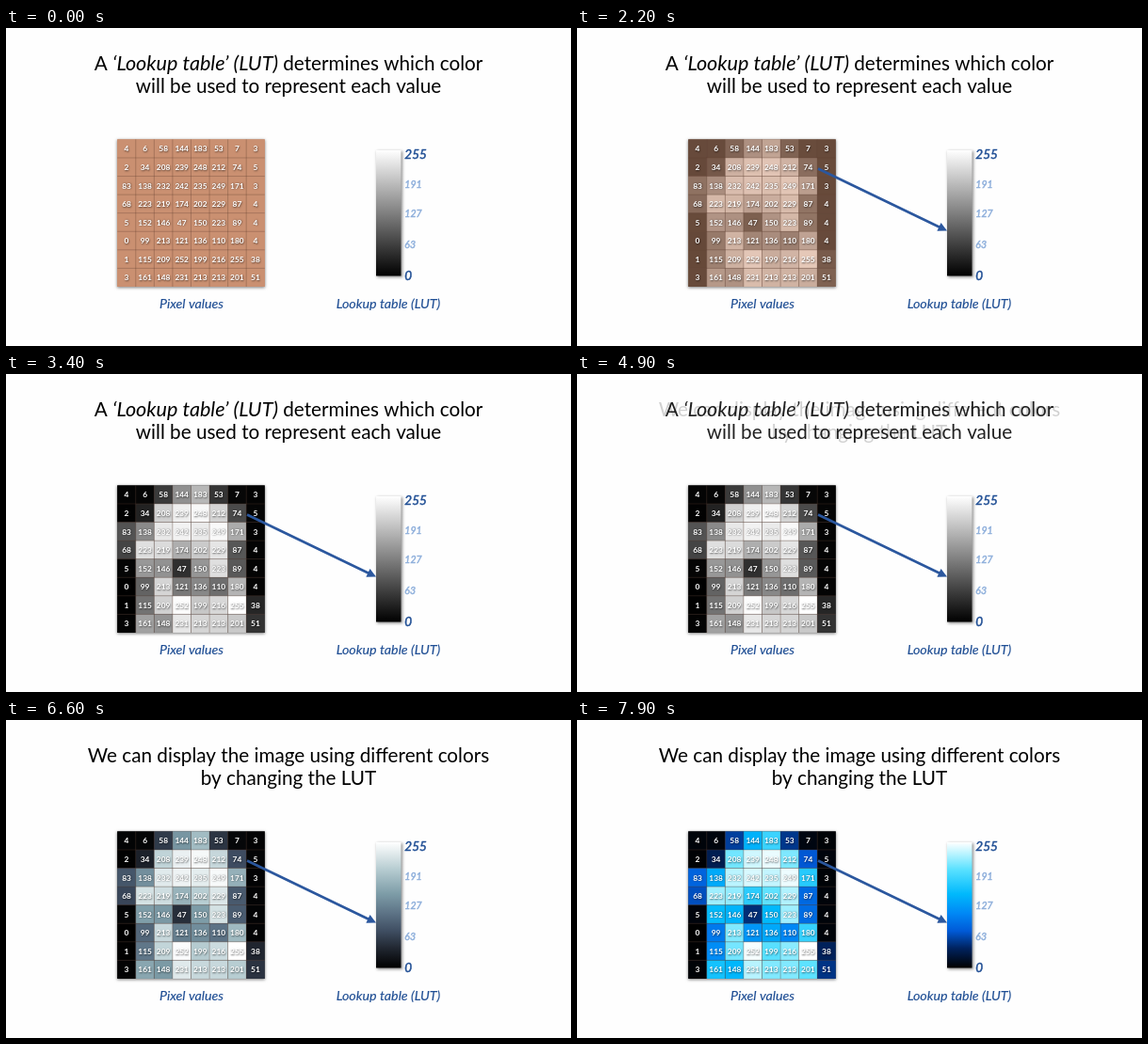
Write an HTML page with a canvas that moves like this. It is 600 by 338 pixels and loops after 8000 ms.

```html
<!DOCTYPE html>
<html lang="en">
<head>
<meta charset="utf-8">
<title>Lookup table</title>
<style>
  html, body { margin: 0; width: 100%; height: 100%; overflow: hidden; background: #fefefe; }
  canvas { display: block; width: 600px; height: 338px; }
</style>
</head>
<body>
<canvas id="stage" width="600" height="338"></canvas>
<script>
const ctx = document.getElementById('stage').getContext('2d');
const LOOP = 8000, STEP = 100;
const FAMILY = 'Lato, "Open Sans", sans-serif';
const DARK = '#1f4e94', PALE = '#8eafdb', ARROW = '#2b579e';
const BROWN = [202, 144, 113];

const pixels = [
  [4, 6, 58, 144, 183, 53, 7, 3],
  [2, 34, 208, 239, 248, 212, 74, 5],
  [83, 138, 232, 242, 235, 249, 171, 3],
  [68, 223, 219, 174, 202, 229, 87, 4],
  [5, 152, 146, 47, 150, 223, 89, 4],
  [0, 99, 213, 121, 136, 110, 180, 4],
  [1, 115, 209, 252, 199, 216, 255, 38],
  [3, 161, 148, 231, 213, 213, 201, 51]
];
const grid = { x: 118.2, y: 118.4, cell: 19.57 };
const bar = { x: 393, y: 130, w: 26.5, h: 133.5 };

// Cyan table: [value, r, g, b]
const cyanStops = [
  [0, 0, 0, 0], [40, 0, 35, 95], [75, 0, 90, 215], [110, 0, 135, 245],
  [150, 0, 185, 252], [200, 90, 225, 255], [230, 180, 243, 255], [255, 255, 255, 255]
];

const progress = (t, start, length) => Math.min(1, Math.max(0, (t - start) / length));
const mix = (a, b, k) => a.map((v, i) => v + (b[i] - v) * k);
const rgb = c => `rgb(${c.map(Math.round).join(',')})`;

function cyan(value) {
  const i = Math.max(1, cyanStops.findIndex(s => s[0] >= value));
  const [lo, ...a] = cyanStops[i - 1], [hi, ...b] = cyanStops[i];
  return mix(a, b, (value - lo) / (hi - lo));
}

const lookup = (value, tint) => mix([value, value, value], cyan(value), tint);

function shadow(color, blur, dx, dy) {
  ctx.shadowColor = color;
  ctx.shadowBlur = blur;
  ctx.shadowOffsetX = dx;
  ctx.shadowOffsetY = dy;
}

function text(str, x, y, font, color, align = 'center', weight = 0) {
  ctx.font = `${font} ${FAMILY}`;
  ctx.fillStyle = ctx.strokeStyle = color;
  ctx.textAlign = align;
  ctx.fillText(str, x, y);
  if (weight) {
    ctx.lineWidth = weight;
    ctx.strokeText(str, x, y);
  }
}

// Centred line; odd parts are italic
function titleLine(parts, y) {
  const font = i => `${i % 2 ? 'italic 21.6px' : '20.7px'} ${FAMILY}`;
  const widths = parts.map((part, i) => {
    ctx.font = font(i);
    return ctx.measureText(part).width;
  });
  let x = 300 - widths.reduce((a, b) => a + b) / 2;
  ctx.textAlign = 'left';
  ctx.fillStyle = '#000';
  parts.forEach((part, i) => {
    ctx.font = font(i);
    ctx.fillText(part, x, y);
    x += widths[i];
  });
}

function title(lines, alpha) {
  if (alpha <= 0) return;
  ctx.globalAlpha = alpha;
  lines.forEach((parts, i) => titleLine(parts, 45 + i * 24));
  ctx.globalAlpha = 1;
}

function drawGrid(reveal, tint) {
  const { x, y, cell } = grid, size = cell * 8;
  ctx.save();
  shadow('rgba(0,0,0,.5)', 3, 0, 1);
  ctx.fillStyle = rgb(mix(BROWN, [60, 60, 60], reveal));
  ctx.fillRect(x, y, size, size);
  ctx.restore();

  pixels.forEach((row, r) => row.forEach((value, c) => {
    ctx.fillStyle = rgb(mix(BROWN, lookup(value, tint), reveal));
    ctx.fillRect(x + c * cell, y + r * cell, cell, cell);
  }));

  ctx.strokeStyle = 'rgba(90,60,45,.45)';
  ctx.lineWidth = 0.7;
  ctx.beginPath();
  for (let i = 1; i < 8; i++) {
    const d = i * cell;
    ctx.moveTo(x + d, y);
    ctx.lineTo(x + d, y + size);
    ctx.moveTo(x, y + d);
    ctx.lineTo(x + size, y + d);
  }
  ctx.stroke();

  ctx.save();
  shadow('rgba(0,0,0,.6)', 2, 0.5, 0.7);
  pixels.forEach((row, r) => row.forEach((value, c) =>
    text(value, x + (c + 0.5) * cell, y + (r + 0.5) * cell + 3.2, 'bold 8.4px', '#fff')));
  ctx.restore();
}

function drawBar(tint) {
  const { x, y, w, h } = bar;
  const ramp = ctx.createLinearGradient(0, y + h, 0, y);
  for (const [value] of cyanStops) ramp.addColorStop(value / 255, rgb(lookup(value, tint)));
  ctx.save();
  shadow('rgba(0,0,0,.45)', 3, 1, 1);
  ctx.fillStyle = ramp;
  ctx.fillRect(x, y, w, h);
  ctx.restore();

  const mark = (value, baseline, size, color) =>
    text(value, 423.3, baseline, `italic ${size}px`, color, 'left', 0.5);
  mark(255, 139, 13.5, DARK);
  mark(191, 169.5, 10.5, PALE);
  mark(127, 200.5, 10.5, PALE);
  mark(63, 234, 10.5, PALE);
  mark(0, 268, 13.5, DARK);
}

const caption = (str, x) => text(str, x, 298, 'italic 14.25px', DARK, 'center', 0.15);

// Arrow wiped in from the left
function drawArrow(shown) {
  if (shown <= 0) return;
  const from = [256, 149.5], to = [393, 215.5];
  const dx = to[0] - from[0], dy = to[1] - from[1];
  const length = Math.hypot(dx, dy);
  ctx.save();
  ctx.beginPath();
  ctx.rect(from[0] - 3, 140, (dx + 6) * shown, 85);
  ctx.clip();
  ctx.translate(...from);
  ctx.rotate(Math.atan2(dy, dx));
  ctx.strokeStyle = ctx.fillStyle = ARROW;
  ctx.lineWidth = 2.6;
  ctx.beginPath();
  ctx.moveTo(0, 0);
  ctx.lineTo(length - 7, 0);
  ctx.stroke();
  ctx.beginPath();
  ctx.moveTo(length, 0);
  ctx.lineTo(length - 9.5, -4.8);
  ctx.lineTo(length - 9.5, 4.8);
  ctx.fill();
  ctx.restore();
}

const firstTitle = [
  ['A ', '‘Lookup table’ (LUT)', ' determines which color'],
  ['will be used to represent each value']
];
const secondTitle = [
  ['We can display the image using different colors'],
  ['by changing the LUT']
];

function draw(t) {
  const tint = progress(t, 6500, 600);
  ctx.fillStyle = '#fefefe';
  ctx.fillRect(0, 0, 600, 338);
  title(firstTitle, 1 - progress(t, 4800, 780));
  title(secondTitle, progress(t, 4800, 560));
  drawGrid(progress(t, 1900, 600), tint);
  drawBar(tint);
  caption('Pixel values', 197);
  caption('Lookup table (LUT)', 406);
  drawArrow(progress(t, 700, 600));
}

function tick() {
  const t = performance.now() % LOOP;
  draw(Math.floor(t / STEP) * STEP);
  requestAnimationFrame(tick);
}
tick();
</script>
</body>
</html>
```
